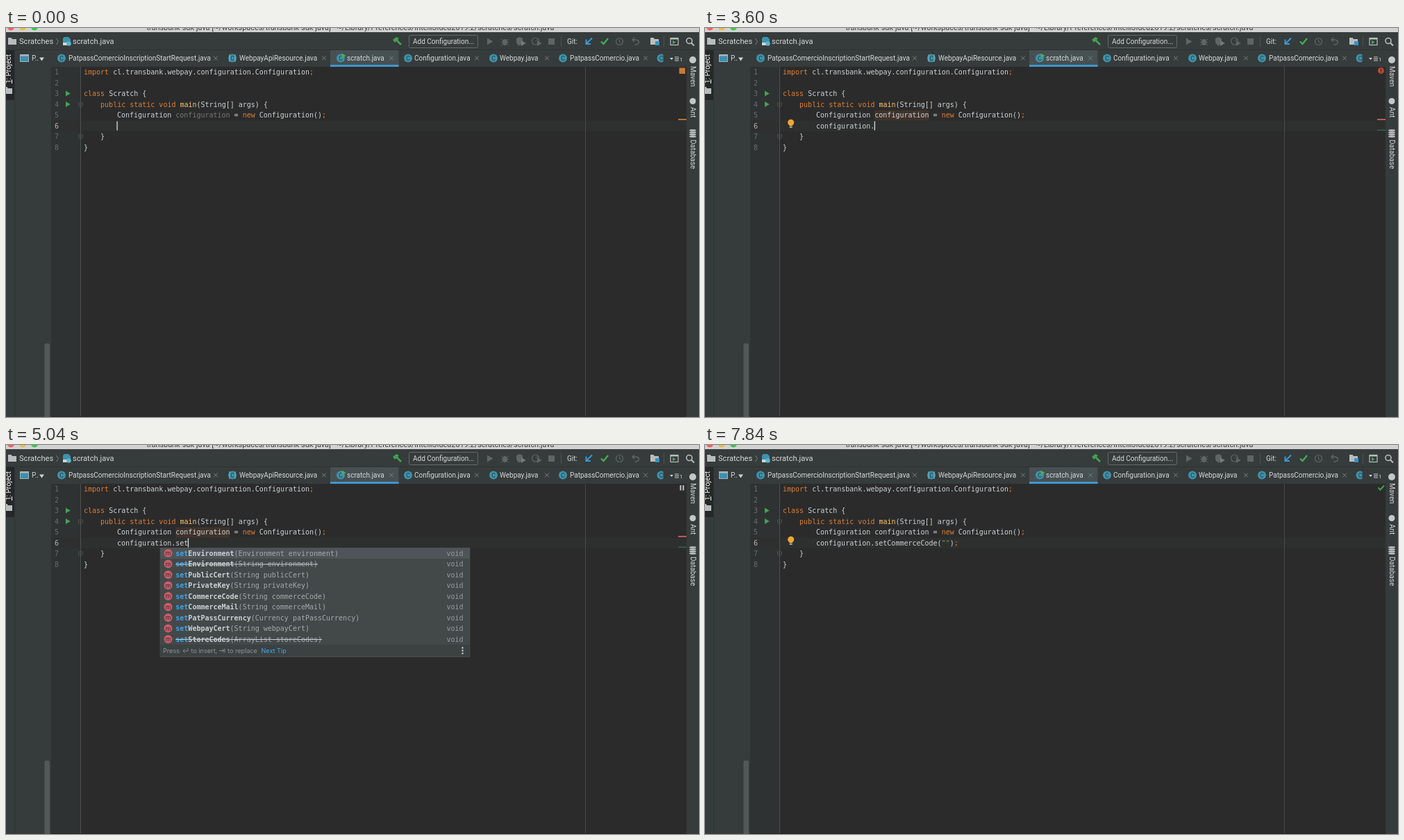
These frames come from a looping animation (998 by 561 pixels, 8 s). An HTML page:

```html
<!DOCTYPE html>
<html lang="en">
<head>
<meta charset="utf-8">
<title>Editor code completion</title>
<style>
html, body { margin: 0; width: 100%; height: 100%; overflow: hidden; background: #2b2b2b; }
svg { display: block; width: 998px; height: 561px; }
text { white-space: pre; }
.ui { font: 10px Roboto, sans-serif; fill: #d6d9da; }
.nav { font-size: 11.1px; }
.code { font: 10px "DejaVu Sans Mono", monospace; fill: #cbd2d7; }
.hint { font: 9.1px Inter, sans-serif; fill: #8f9498; }
.kw { fill: #de7f35; }
.fn { fill: #ffc66d; }
.dim { fill: #75777a; }
.str { fill: #6f9460; }
.hit { fill: #3da5ee; }
.type { fill: #969b9e; text-anchor: end; }
.args { fill: #a4aaae; }
.bold { font-weight: bold; }
.old { text-decoration: line-through; }
.num { fill: #686d6e; text-anchor: middle; }
.link { fill: #3fa9f2; }
.line { fill: none; stroke-width: 1; }
</style>
</head>
<body>
<svg viewBox="0 0 998 561">
  <g id="base"></g>
  <g id="live"></g>
</svg>
<script>
const LOOP = 8000, CHAR = 6.02, PITCH = 15.47, PANEL = '#363b3b';
const lineY = n => 67.3 + PITCH * (n - 1);
const colX = n => 160 + CHAR * n;

const rect = (x, y, w, h, fill, more = '') => `<rect x="${x}" y="${y}" width="${w}" height="${h}" fill="${fill}" ${more}/>`;
const disc = (x, y, r, fill) => `<circle cx="${x}" cy="${y}" r="${r}" fill="${fill}"/>`;
const shape = (d, fill) => `<path d="${d}" fill="${fill}"/>`;
const stroke = (d, color, w = 1) => `<path d="${d}" class="line" style="stroke:${color};stroke-width:${w}"/>`;
const text = (x, y, s, cls = 'ui', more = '') => `<text x="${x}" y="${y}" class="${cls}" ${more}>${s}</text>`;
const span = (cls, s) => `<tspan class="${cls}">${s}</tspan>`;
const ring = (x, y, r, color, w = 1.2) => `<circle cx="${x}" cy="${y}" r="${r}" class="line" style="stroke:${color};stroke-width:${w}"/>`;
const badge = (x, y, letter, fill, ink = '#26343a') =>
  disc(x, y, 6, fill) + text(x, y + 3, letter, 'ui', `text-anchor="middle" style="font-size:8.5px;fill:${ink}"`);
const folder = (x, y, c) => shape(`M${x} ${y}h4.5l1.5 2h6v8h-12z`, c);
const cross = (x, y) => stroke(`M${x - 2.8} ${y - 2.8}l5.6 5.6m0 -5.6l-5.6 5.6`, '#7d8183');
const play = (x, y, s, c) => shape(`M${x} ${y - s}l${s * 1.7} ${s}l${-s * 1.7} ${s}z`, c);
const fold = y => stroke(`M104.5 ${y - 3}h6v4l-3 2.5l-3 -2.5zM106 ${y}h3`, '#55595a', .8);
const squiggle = (x, n) => stroke(`M${x} 147.5` + 'l1.5 -1.5l1.5 1.5'.repeat(n), '#bc3f3c');

function toolbar() {
  const grey = '#5f6464', lite = '#b9bdbe';
  const path = 'transbank-sdk-java [~/workspaces/transbank-sdk-java] - ~/Library/Preferences/IntelliJIdea2019.2/scratches/scratch.java';
  return rect(0, 0, 998, 56, PANEL) + rect(0, 0, 998, 6, '#d2d2d2')
    + text(496, 2.8, path, 'ui', 'text-anchor="middle" style="font-size:10.9px;fill:#3c3c3c"')
    + ['#fc5b57', '#e5bf3c', '#34c84a'].map((c, i) => disc(7 + 17 * i, -1.5, 5, c)).join('')
    + folder(3, 14, lite) + text(19, 23, 'Scratches', 'ui nav')
    + stroke('M72.5 15l3 4.5l-3 4.5', '#7b7f81')
    + shape('M84 13h6l3 3v8h-11v-9z', '#3d93ab') + rect(82, 21, 7, 4, '#d2d5d6') + disc(90.5, 22.5, 3.3, '#5ab4cc')
    + text(96, 23, 'scratch.java', 'ui nav')
    + shape('M557 17l5 -4l4 2l-2 2l6 6l-2 2l-6 -6l-2 2z', '#41a24f')
    + rect(580.5, 10.5, 99, 18, PANEL, 'rx="2" stroke="#646869"') + text(586, 23, 'Add Configuration...')
    + play(693, 19.5, 5, grey)
    + `<ellipse cx="718.5" cy="20.5" rx="3.5" ry="4.5" fill="${grey}"/>` + stroke('M713 16l11 9m-11 0l11 -9M713 20.5h11', grey)
    + shape('M735 15l4.5 -2l4.5 2v5q-1 4 -4.5 5.5q-4 -2 -4.5 -5.5z', grey) + play(742, 22, 4, '#747979')
    + ring(762.5, 19, 5, grey) + stroke('M762.5 19l3 -3', grey) + play(765, 22, 4, grey)
    + rect(781, 15, 9, 9, grey) + rect(799, 12, 1, 15, '#4d5252')
    + text(808, 23, 'Git:')
    + stroke('M844 14.5l-8.5 8.5m0 -6.5v6.5h6.5', '#3b9ad3', 2)
    + stroke('M857 19.5l3.5 3.5l6.5 -8', '#43ad53', 2.3)
    + ring(883.5, 19.5, 5, grey) + stroke('M883.5 16v4l2.5 1.5', grey)
    + stroke('M905 14l-3 3l3 3M902 17h5.5q4 1 4 3.5t-4 3.5h-2', grey, 1.4)
    + folder(928, 14, lite) + rect(935, 19, 6, 6, '#3592c4') + rect(947, 12, 1, 15, '#4d5252')
    + rect(957, 14.5, 11, 10, 'none', `stroke="${lite}" stroke-width="1.2"`) + rect(957, 14, 11, 2.5, lite) + play(960, 20.5, 2.8, '#47a554')
    + ring(984, 18.5, 4, lite, 1.6) + stroke('M987 21.5l4 4', lite, 2);
}

function tabs() {
  const list = [
    [80, 90, 302, 'PatpassComercioInscriptionStartRequest'], [326, 336, 458, 'WebpayApiResource'],
    [482, 491, 555, 'scratch'], [579, 588, 678, 'Configuration'],
    [702, 711, 779, 'Webpay'], [802, 812, 921, 'PatpassComercio']
  ];
  return rect(0, 31, 998, 1, '#2e3232') + rect(467, 32, 98.5, 24, '#475053') + rect(467, 53, 98.5, 3, '#3f97cc')
    + rect(20.5, 38.5, 12, 10, '#3d8fb0', 'stroke="#9eb3bb"') + rect(20, 38, 13, 2.5, '#aeb5b8')
    + text(37, 47, 'P..') + shape('M48 42.5h7l-3.5 5z', '#d0d3d4')
    + list.map(([ic, x, end, name]) => badge(ic, 43.5, 'C', '#3d93ab') + text(x, 47, name + '.java') + cross(end, 43.5)).join('')
    + stroke('M322 38v11m8 -11v11', '#76b3c5') + play(483.5, 40, 3.5, '#4dad58')
    + badge(943.5, 43.5, 'C', '#3d93ab') + rect(946.5, 33, 33.5, 22, PANEL)
    + shape('M956 43h5l-2.5 3z', '#d0d3d4') + stroke('M963 42h6m-6 2.5h6m-6 2.5h6', '#d0d3d4') + text(970, 47.5, '1', 'ui', 'style="font-size:8px"');
}

function sides() {
  const side = (x, y, turn, s, more = '') => text(0, 0, s, 'ui', `transform="translate(${x} ${y}) rotate(${turn})" ${more}`);
  return rect(0, 56, 65, 505, PANEL) + rect(0, 32, 12, 72, '#252828') + rect(12, 32, 1, 529, '#2f3333')
    + side(7, 80, -90, '<tspan text-decoration="underline">1</tspan>: Project', 'style="fill:#fff"') + folder(-3, 85, '#b9bdbe')
    + rect(55.5, 455, 7.5, 110, '#525858', 'rx="2"') + rect(65, 56, 1, 505, '#2d3131')
    + rect(980, 32, 18, 529, PANEL) + rect(979.5, 56, 1, 505, '#303434')
    + disc(989, 46, 5, '#c3c7c8') + side(985.5, 55, 90, 'Maven')
    + disc(989, 105.5, 4.5, '#c3c7c8') + side(985.5, 114, 90, 'Ant')
    + [148, 151, 154, 157].map(y => `<ellipse cx="989" cy="${y - .5}" rx="5" ry="1.3" fill="#c3c7c8"/>`).join('')
    + side(985.5, 161, 90, 'Database');
}

function editor() {
  let out = rect(66, 56, 42, 505, '#2f3232') + rect(66, 133.5, 914, 15.5, '#2e2f2f')
    + rect(107, 56, 1, 505, '#4d5151') + rect(834, 56, 1, 505, '#474a4b');
  for (let n = 1; n < 9; n++) out += text(73, lineY(n), n, 'code num', n === 6 ? 'style="fill:#b4b6b7"' : '');
  const code = (n, indent, s) => text(112 + indent * CHAR, lineY(n), s, 'code');
  return out + play(86, 94.5, 4, '#43a352') + play(86, 110, 4, '#43a352') + fold(111) + fold(157)
    + code(1, 0, span('kw', 'import') + ' cl.transbank.webpay.configuration.Configuration' + span('kw', ';'))
    + code(3, 0, span('kw', 'class') + ' Scratch {')
    + code(4, 4, span('kw', 'public static void ') + span('fn', 'main') + '(String[] args) {')
    + code(7, 4, '}') + code(8, 0, '}') + rect(0, 560, 998, 1, '#242526');
}

const setters = ['Environment(Environment environment)', '-Environment(String environment)',
  'PublicCert(String publicCert)', 'PrivateKey(String privateKey)', 'CommerceCode(String commerceCode)',
  'CommerceMail(String commerceMail)', 'PatPassCurrency(Currency patPassCurrency)',
  'WebpayCert(String webpayCert)', '-StoreCodes(ArrayList storeCodes)'].map(s => {
    const [, old, name, args] = s.match(/(-?)(\w+)(.*)/);
    return { name: 'set' + name, args, type: 'void', old, method: true };
  });
const getters = setters.filter((m, i) => i !== 1).map(m => ({ ...m, name: m.name.replace('set', 'get'), args: '()', type: 'String' }));
const postfix = [['serr', 'System.err.println(expr)'], ['souf', 'System.out.printf("", expr)'], ['sout', 'System.out.println(expr)'],
  ['soutv', 'System.out.println(expr)'], ['synchronized', 'synchronized (expr)']].map(([name, type]) => ({ name, type, args: '' }));
const pick = (...ids) => ids.map(i => setters[i]);
const lists = {
  confi: [{ name: 'configuration', type: 'Configuration', args: '', local: true }],
  '.': [...getters, ...setters], S: postfix, s: [...setters, ...postfix], se: [...setters, postfix[0]],
  set: setters, setc: pick(4, 5, 2, 6, 7, 8), setco: pick(4, 5, 8)
};

// Marks the typed prefix, then the capitalised rest inside the name.
function marked(name, query) {
  const head = query.slice(0, 3), rest = query.slice(3);
  if (query === 'confi') return span('hit', query) + name.slice(5);
  if (!name.startsWith(head)) return name;
  if (!rest) return span('hit', head) + name.slice(head.length);
  const part = rest[0].toUpperCase() + rest.slice(1), at = name.indexOf(part, 3);
  return span('hit', head) + name.slice(3, at) + span('hit', part) + name.slice(at + part.length);
}

function popup(query) {
  const list = lists[query], x = query === 'confi' ? 137.5 : 222, top = 148.5;
  const rows = Math.min(list.length, 11.5), h = rows * 15.5, foot = top + h, right = x + 446;
  let out = rect(x, top, 446, h + 17.5, '#434849') + rect(x, top, 446, 15.5, '#4e5457');
  list.slice(0, 12).forEach((it, i) => {
    const y = 156 + 15.5 * i;
    if (it.method) out += badge(x + 11.5, y, 'm', '#c75d69', '#3a2529');
    if (it.local) out += badge(x + 12, y, 'v', '#c8793d', '#3b2b20');
    out += text(x + 22.3, y + 3.5, `<tspan class="${it.method ? 'bold' : ''}">${marked(it.name, query)}</tspan>` + span('args', it.args), 'code ' + (it.old ? 'old' : ''))
      + text(right - 9.5, y + 3.5, it.type, 'code type');
  });
  const y = foot + 12;
  return out + rect(x, foot, 446, 17.5, '#3c4142')
    + text(x + 4, y, 'Press', 'hint') + stroke(`M${x + 40} ${y - 7}v4h-7m2.5 -2.5l-2.5 2.5l2.5 2.5`, '#8f9498', .9)
    + text(x + 44.5, y, 'to insert,', 'hint') + stroke(`M${x + 85} ${y - 3.5}h7m-2.5 -2.5l2.5 2.5l-2.5 2.5M${x + 93} ${y - 6.5}v6`, '#8f9498', .9)
    + text(x + 97, y, 'to replace', 'hint') + text(x + 145.5, y, 'Next Tip', 'hint link')
    + [-7.5, -3.5, .5].map(d => disc(right - 10.5, y + d, 1.2, '#c8cccd')).join('')
    + rect(x, top, 446, h + 17.5, 'none', 'stroke="#505456" stroke-width=".6"');
}

const status = {
  warn: rect(969.5, 57.5, 8.5, 8.5, '#cc7a34'),
  pause: rect(970.5, 58, 2, 7.5, '#c3c7c8') + rect(974.5, 58, 2, 7.5, '#c3c7c8'),
  error: disc(973.5, 61.5, 4.5, '#b8482f') + rect(973, 58.8, 1.2, 3.5, '#2b2b2b') + rect(973, 63.2, 1.2, 1.2, '#2b2b2b'),
  eye: shape('M968.5 61.8q5 -7 10.5 0q-5 7 -10.5 0z', '#c3c7c8') + disc(973.7, 61.8, 2.3, '#2b2b2b') + disc(973.7, 61.8, 1, '#c3c7c8'),
  ok: stroke('M969.5 61.5l3 3l5.5 -6', '#3da64e', 2)
};

// Each entry: time, then what changes in the state.
const start = { typed: '', caret: 0, on: 1, pop: '', mark: 'warn', used: 0, stripes: 'warn', bulb: 0, wave: 0, pair: 0 };
const word = 'configuration', call = word + '.setCommerceCode(';
const type = s => ({ typed: s, caret: s.length, on: 1 });
const steps = [
  [160, { on: 0 }], [320, { ...type('c'), mark: 'eye' }], [480, type('co')], [560, type('con')], [720, type('conf')],
  [800, type('confi')], [880, { pop: 'confi' }], [960, { mark: 'pause' }],
  [1120, { ...type(word), pop: '' }], [1200, { mark: 'eye' }],
  [1440, { mark: 'error', used: 1, stripes: 'error', wave: [238, 2] }], [1840, { bulb: 1 }],
  [2080, { on: 0 }], [2560, { on: 1 }], [3040, { on: 0 }],
  [3520, { ...type(word + '.'), wave: 0 }], [3680, { mark: 'eye', bulb: 0 }], [3760, { pop: '.', mark: 'pause' }],
  [4080, type(word + '.S')], [4160, { pop: 'S', wave: [250, 2] }],
  [4480, { ...type(word + '.'), wave: 0 }], [4560, { pop: '.' }], [4640, type(word + '.s')], [4720, { pop: 's' }],
  [4800, type(word + '.se')], [4880, { pop: 'se' }], [4960, type(word + '.set')], [5040, { pop: 'set' }],
  [5200, type(word + '.setc')], [5280, { pop: 'setc' }], [5440, type(word + '.setco')], [5520, { pop: 'setco' }],
  [5920, { pop: '', typed: call + ');', caret: call.length, mark: 'eye' }], [6000, { pair: 1, wave: [352, 2] }],
  [6160, { wave: 0 }], [6240, { mark: 'error', wave: [334.5, 4] }],
  [6480, { typed: call + '"");', caret: call.length + 1, pair: 0 }], [6800, { mark: 'eye', wave: 0 }],
  [7040, { mark: 'ok', stripes: '' }], [7520, { bulb: 1 }], [7840, { on: 0 }]
];

function draw(s) {
  const typed = s.typed.replace(/""/, span('str', '""')).replace(/;$/, span('kw', ';'))
    .replace('()', s.pair ? span('fn bold', '()') : '()');
  let out = '';
  if (s.stripes === 'error') out += rect(colX(14), 118.5, 13 * CHAR, 15, '#40332b');
  out += text(160, lineY(5), 'Configuration ' + span(s.used ? '' : 'dim', word) + ' = ' + span('kw', 'new') + ' Configuration()' + span('kw', ';'), 'code');
  if (s.pair) out += rect(colX(call.length - 1), 134, 2 * CHAR, 14, '#3b514d');
  out += text(160, lineY(6), typed, 'code');
  if (s.wave) out += squiggle(...s.wave);
  if (s.on) out += rect(colX(s.caret) - .6, 134.5, 1.4, 13, '#d0d4d5');
  if (s.bulb) out += disc(123.7, 136.3, 4.5, '#efa731') + rect(121.7, 139, 4, 2.5, '#efa731') + rect(121.7, 142.2, 4, 1.8, '#a4a9ab');
  if (s.stripes === 'warn') out += rect(968, 131, 12, 1.8, '#c57a38');
  if (s.stripes === 'error') out += rect(968, 131, 12, 1.8, '#c9625a') + rect(968, 146.7, 12, 1.3, '#2f6a57');
  return out + status[s.mark] + (s.pop ? popup(s.pop) : '');
}

document.getElementById('base').innerHTML = editor() + toolbar() + tabs() + sides();
const live = document.getElementById('live');
let shown = -1;
function tick() {
  const t = performance.now() % LOOP;
  const count = steps.filter(([at]) => at <= t).length;
  if (count !== shown) {
    shown = count;
    live.innerHTML = draw(Object.assign({}, start, ...steps.slice(0, count).map(e => e[1])));
  }
  requestAnimationFrame(tick);
}
tick();
</script>
</body>
</html>
```
